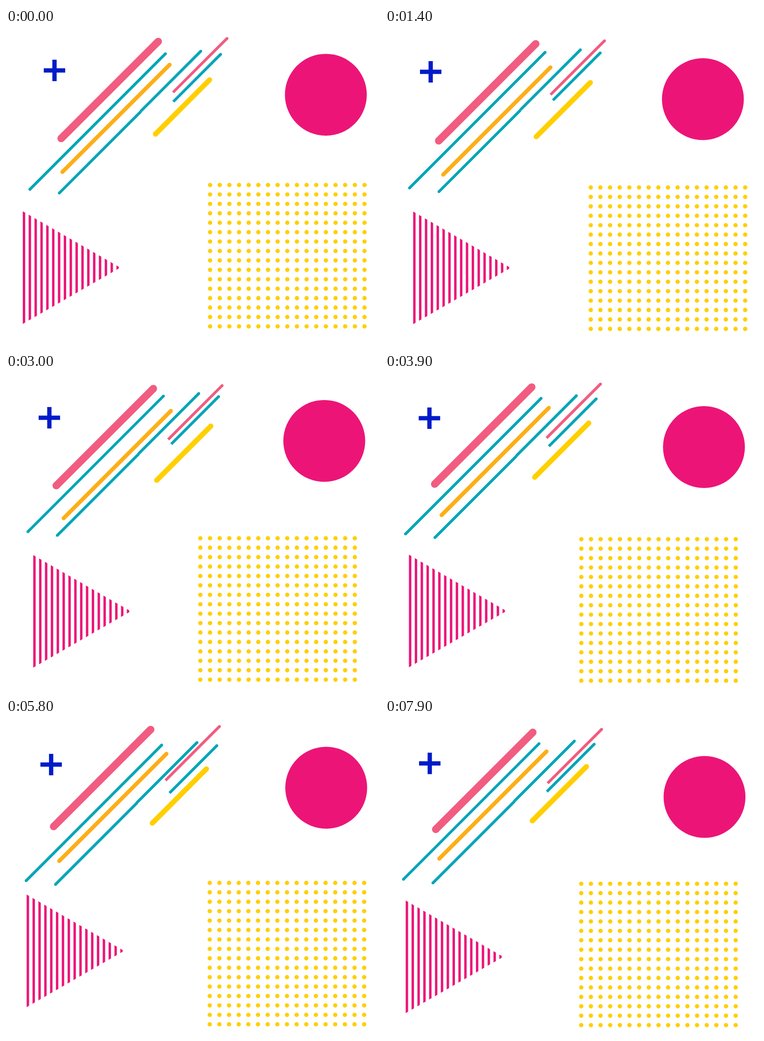
Animation of 800 by 680 pixels, one loop 8000 ms. Source, as an HTML page with a canvas:

```html
<!DOCTYPE html>
<html lang="en">
<head>
<meta charset="utf-8">
<title>Drifting shapes</title>
<style>
  html, body { margin: 0; width: 100%; height: 100%; overflow: hidden; background: #fff; }
  canvas { display: block; }
</style>
</head>
<body>
<canvas id="stage" width="800" height="680"></canvas>
<script>
const ctx = document.getElementById('stage').getContext('2d');
const LOOP = 8000, STEP = 100;
const MAGENTA = '#ec1577', PINK = '#f15c80', TEAL = '#00a5b8',
      ORANGE = '#fdae17', YELLOW = '#ffcf00', BLUE = '#001bc8';

// Knot times in steps, shared by every track; "extra" adds knots as {step: value}.
const TIMES = [0, 14, 30, 47, 58, 71, 79];

function track(values, extra = {}) {
  const knots = TIMES.map((t, i) => [t, values[i]])
    .concat(Object.entries(extra).map(([t, v]) => [+t, v]))
    .sort((a, b) => a[0] - b[0]);
  const last = knots.length - 1;
  const slope = i => {
    const a = knots[Math.max(i - 1, 0)], b = knots[Math.min(i + 1, last)];
    return (b[1] - a[1]) / (b[0] - a[0]);
  };
  // Cubic Hermite curve through the knots
  return t => {
    let i = 0;
    while (i < last - 1 && t >= knots[i + 1][0]) i++;
    const [t0, v0] = knots[i], [t1, v1] = knots[i + 1];
    const d = t1 - t0, u = (t - t0) / d, w = 1 - u;
    return v0 * w * w * (1 + 2 * u) + v1 * u * u * (3 - 2 * u)
      + d * u * w * (slope(i) * w - slope(i + 1) * u);
  };
}

function disc(x, y, r, color) {
  ctx.fillStyle = color;
  ctx.beginPath();
  ctx.arc(x, y, r, 0, 2 * Math.PI);
  ctx.fill();
}

function line(x1, y1, x2, y2, width, color, flatStart) {
  ctx.strokeStyle = color;
  ctx.lineWidth = width;
  ctx.beginPath();
  ctx.moveTo(x1, y1);
  ctx.lineTo(x2, y2);
  ctx.stroke();
  if (!flatStart) disc(x1, y1, width / 2, color);
  disc(x2, y2, width / 2, color);
}

function drawPlus() {
  ctx.fillStyle = BLUE;
  ctx.fillRect(81, 86.4, 46, 9.2);
  ctx.fillRect(99.4, 68, 9.2, 46);
}

function drawTriangle() {
  const left = 36, middle = 514, half = 120.7, width = 5.2;
  const reach = x => half - (x - left) * 0.577;
  ctx.fillStyle = MAGENTA;
  for (let i = 0; i < 17; i++) {
    const a = left + i * 12.55, b = a + width;
    ctx.beginPath();
    ctx.moveTo(a, middle - reach(a));
    ctx.lineTo(b, middle - reach(b));
    ctx.lineTo(b, middle + reach(b));
    ctx.lineTo(a, middle + reach(a));
    ctx.fill();
  }
}

function drawDots() {
  for (let row = 0; row < 16; row++)
    for (let col = 0; col < 17; col++)
      disc(437.7 + col * 20.7, 336.8 + row * 20.22, 4.6, YELLOW);
}

function drawPinkLines() {
  line(118.3, 237, 326.5, 28.9, 16, PINK);
  line(358.3, 138, 474, 22.4, 6, PINK, true);
}

function drawTealLines() {
  line(51.2, 346.2, 342, 55.2, 6, TEAL);
  line(288.5, 179, 417.7, 49.8, 6, TEAL, true);
  line(289, 179.3, 114.3, 354, 6, TEAL, true);
  line(358.8, 158, 460.3, 56.4, 6, TEAL, true);
}

function drawWarmLines() {
  line(121, 308.8, 351, 78.7, 8.5, ORANGE);
  line(320.6, 227.5, 436.7, 111.2, 11, YELLOW);
}

const groups = [
  { draw: drawPlus,
    x: track([0, -6, -11, -6.2, -7.2, -7, -8]),
    y: track([0, 3, 5, 6.9, 8.9, 7.2, 6.4]) },
  { draw: () => disc(686, 143.2, 87.8, MAGENTA),
    x: track([0, -4.2, -3.4, -0.5, 0.8, 0.5, -0.7]),
    y: track([0, 9.4, 2.5, 25.5, 6.4, 18.3, 26.1]) },
  { draw: drawDots,
    x: track([0, 3.6, -20.8, -9.4, -0.7, -2.7, -16.8], { 9: 8.2, 18: -4 }),
    y: track([0, 5.3, 17.7, 17.3, 16.9, 16.9, 18.7], { 9: 3.2, 18: 8, 36: 20.3 }) },
  { draw: drawTriangle,
    x: track([0, 24.4, 22.4, 9, 8.3, 5, 8.4], { 3: -2, 9: 10 }),
    y: track([0, 0.5, -2.8, -5.1, -14.5, -8.2, -1.7]) },
  { draw: drawTealLines,
    x: track([0, 1.4, -4.3, -13.3, -8.1, -11, -11.6], { 36: -5, 45: -12.8, 54: -10, 75: -13.6 }),
    y: track([0, -3, -5.7, 3.6, 2.9, 4, -0.2]) },
  { draw: drawWarmLines,
    x: track([0, 3.8, 2.6, -2.2, -6.8, -0.5, -4.6]),
    y: track([0, 5.7, 2.6, -8.5, -2, -7.6, -7]) },
  { draw: drawPinkLines,
    x: track([0, -3.2, -10.5, -12.7, -16.2, -16.3, -9.5]),
    y: track([0, 5, 4.6, 2.4, -4.2, 2, 1.9],
      { 4: -2, 10: 1, 19: 5, 36: 1.3, 54: 0, 61: -6, 64: -5 }) },
];

function frame(now) {
  const step = Math.floor(now % LOOP / STEP);
  ctx.clearRect(0, 0, 800, 680);
  for (const { draw, x, y } of groups) {
    ctx.save();
    ctx.translate(x(step), y(step));
    draw();
    ctx.restore();
  }
  requestAnimationFrame(() => frame(performance.now() - start));
}

const start = performance.now();
frame(0);
</script>
</body>
</html>
```
